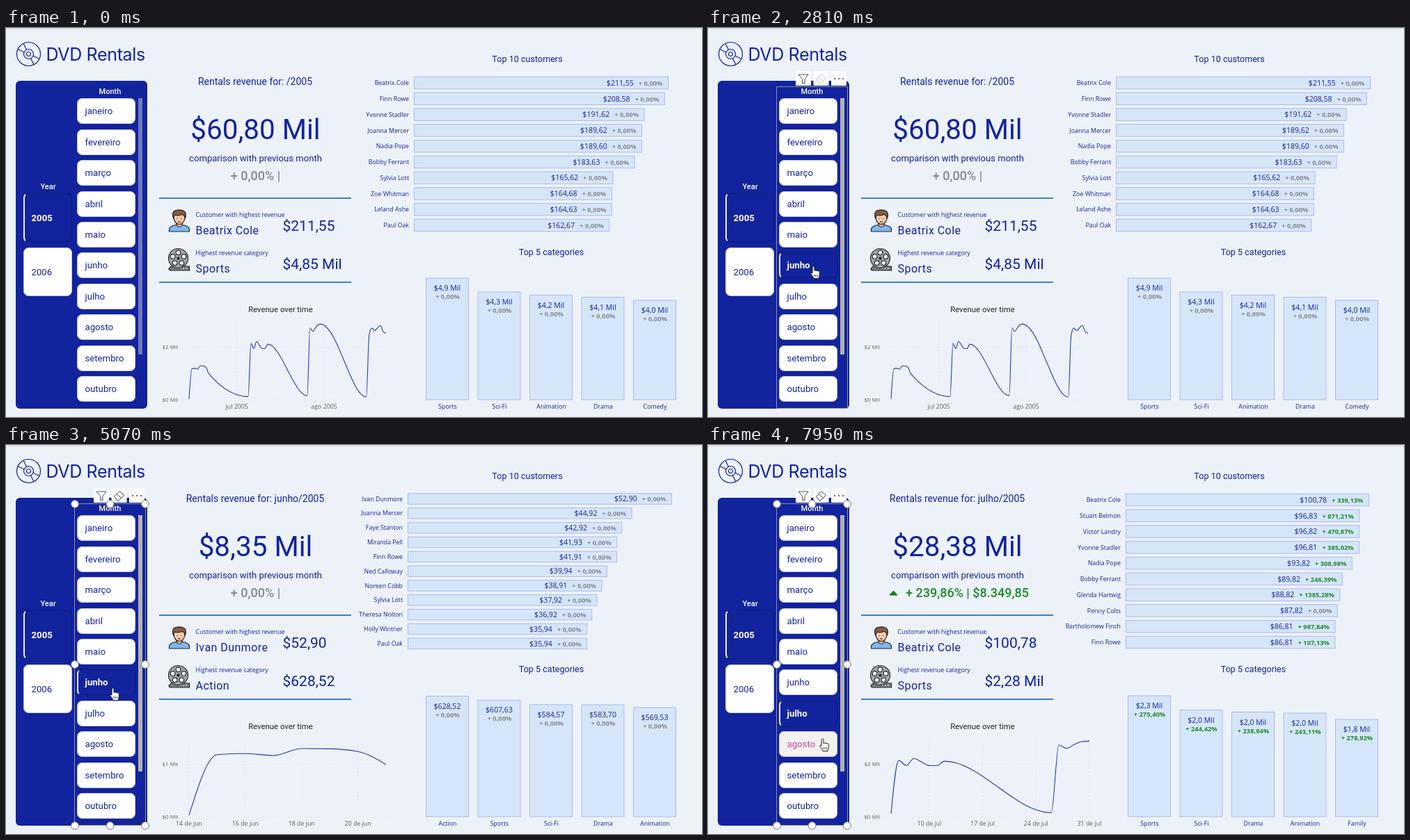
Write an HTML page that moves like this. It is 1000 px wide and 560 px high and loops after 8000 ms.

```html
<!DOCTYPE html>
<html lang="en">
<head>
<meta charset="utf-8">
<title>DVD Rentals</title>
<style>
html, body { margin: 0; width: 100%; height: 100%; overflow: hidden; background: #edf2f8; }
svg { display: block; width: 1000px; height: 560px; }
text { font-family: Roboto, "DejaVu Sans", sans-serif; font-weight: 400; fill: #12239e; }
.ui { font-family: "Open Sans", "Noto Sans", sans-serif; }
.logo { font: 400 25px Inter, sans-serif; letter-spacing: -.35px; }
.title { font-size: 14px; }
.sub { font-size: 13.1px; }
.total { font-size: 40.4px; }
.compare { font-size: 18px; font-weight: 500; }
.head { font-size: 12.6px; }
.dark { font-size: 11.35px; fill: #252423; }
.slicer { font-size: 11px; font-weight: 500; fill: #fff; }
.item { font-size: 13.2px; }
.best { font-size: 16px; letter-spacing: .45px; }
.money { font-size: 21px; }
.small { font-size: 8.8px; }
.value { font-size: 10.6px; }
.tick { font-size: 8.8px; fill: #605e5c; }
.ytick { font-size: 8px; fill: #605e5c; }
.pct { font-size: 9.3px; font-weight: 700; }
.gray { fill: #86888f; }
.up { fill: #1f8a2c; }
.white { fill: #fff; }
.pink { fill: #d0459f; }
.bold { font-weight: 600; }
.bar { fill: #d6e6f9; stroke: #abbbe9; }
.grid { stroke: #d3d8df; stroke-dasharray: 1 4; }
.line { fill: none; stroke: #2b3aa9; stroke-width: 1.1; }

.all, .jun, .jul, .idle, .focus, .clean, .handles, .overJun, .pickJun,
.overJul, .pickJul, .overAgo, .dots, .cursor { animation: 8s step-end infinite; }
.all { animation-name: all; }
.jun { animation-name: jun; }
.jul { animation-name: jul; }
.idle { animation-name: idle; }
.focus { animation-name: focus; }
.clean { animation-name: clean; }
.handles { animation-name: handles; }
.overJun { animation-name: overJun; }
.pickJun { animation-name: pickJun; }
.overJul { animation-name: overJul; }
.pickJul { animation-name: pickJul; }
.overAgo { animation-name: overAgo; }
.dots { animation-name: dots, spin; }
.cursor { animation-name: enter, move; }

@keyframes all { 0% { visibility: visible } 51.875%, to { visibility: hidden } }
@keyframes jun { 0% { visibility: hidden } 51.875% { visibility: visible } 79.375%, to { visibility: hidden } }
@keyframes jul { 0% { visibility: hidden } 79.375%, to { visibility: visible } }
@keyframes idle { 0% { visibility: visible } 22.25%, to { visibility: hidden } }
@keyframes focus { 0% { visibility: hidden } 22.25%, to { visibility: visible } }
@keyframes clean { 0% { visibility: hidden } 22.25% { visibility: visible } 47.625%, to { visibility: hidden } }
@keyframes handles { 0% { visibility: hidden } 47.625%, to { visibility: visible } }
@keyframes overJun { 0% { visibility: hidden } 24% { visibility: visible } 34.25%, to { visibility: hidden } }
@keyframes pickJun { 0% { visibility: hidden } 34.25% { visibility: visible } 76%, to { visibility: hidden } }
@keyframes overJul {
  0% { visibility: hidden } 22.25% { visibility: visible } 24% { visibility: hidden }
  65.125% { visibility: visible } 71.75%, to { visibility: hidden }
}
@keyframes pickJul { 0% { visibility: hidden } 71.75%, to { visibility: visible } }
@keyframes overAgo { 0% { visibility: hidden } 97.75%, to { visibility: visible } }
@keyframes dots {
  0% { visibility: hidden } 47.625% { visibility: visible } 51.875% { visibility: hidden }
  76% { visibility: visible } 79.375%, to { visibility: hidden }
}
@keyframes spin {
  0%, 47.625%, 76% { transform: translate(0, 0) }
  48.375%, 76.875% { transform: translate(-1px, 1px) }
  49.375%, 77.75% { transform: translate(-4px, 0) }
  50.5% { transform: translate(-4px, -3px) }
  78.625%, to { transform: translate(-2px, -3px) }
}
@keyframes enter { 0% { visibility: hidden } 21.375%, to { visibility: visible } }
@keyframes move {
  0% { transform: translate(82px, 425px) }
  22.25% { transform: translate(108px, 408px) }
  23.125% { transform: translate(140px, 388px) }
  24% { transform: translate(165px, 366px) }
  24.875% { transform: translate(177px, 360px) }
  25.75% { transform: translate(179px, 358px) }
  26.625% { transform: translate(170px, 357px) }
  27.5% { transform: translate(160px, 354px) }
  28.375% { transform: translate(154px, 352px) }
  63.375% { transform: translate(156px, 359px) }
  64.25% { transform: translate(157px, 367px) }
  65.125% { transform: translate(158px, 376px) }
  66% { transform: translate(158px, 381px) }
  66.75% { transform: translate(157px, 385px) }
  67.625% { transform: translate(156px, 388px) }
  73.5% { transform: translate(164px, 393px) }
  76% { transform: translate(163px, 398px) }
  96% { transform: translate(164px, 405px) }
  96.875% { transform: translate(165px, 413px) }
  97.75% { transform: translate(166px, 421px) }
  98.625% { transform: translate(167px, 427px) }
  99.375%, to { transform: translate(167px, 432px) }
}
</style>
</head>
<body>
<svg viewBox="0 0 1000 560">
  <rect width="1000" height="560" fill="#edf2f8"/>
  <rect width="1000" height="2" fill="#dfe2e7"/>

  <!-- disc -->
  <g fill="none" stroke="#12239e" stroke-width="1.2" transform="translate(32.5 37.5)">
    <circle r="17"/><circle r="7"/><circle r="3"/>
    <path d="M-6.5-2.500L-15.500-7M-3-6.300L-7.500-15.300M6.500 2.500L15.500 7M3 6.300L7.500 15.300"/>
  </g>

  <rect x="14" y="76" width="189" height="472" rx="6" fill="#12239e"/>
  <rect class="idle" x="190" y="101" width="6" height="369" fill="#6f79c0"/>
  <g id="slicers"></g>

  <path d="M220 245H496M220 366H496" stroke="#3583c9" stroke-width="2"/>

  <!-- person -->
  <g stroke="#23262f" stroke-width="1.2" stroke-linejoin="round">
    <path d="M234.500 293V290Q235 285 244 283.500H254Q263 285 263.500 290V293Z" fill="#7fb8f2"/>
    <path d="M245 279V284Q249 289 253 284V279Z" fill="#efb891"/>
    <path d="M241 269V274Q243 282.500 249 282.500T257 274V269Q249 263 241 269Z" fill="#f8cda8"/>
    <path d="M240.500 274Q237.500 264 244 262.500Q253 260.500 257 264.500Q259.500 268 257.500 274Q256.500 269 253 268.500Q247 271 242.500 269Z" fill="#8a5a3f"/>
    <path d="M246 274v1M252 274v1M247 278.500q2 1.200 4 0" fill="none"/>
  </g>

  <!-- film reel -->
  <g stroke="#24262b" stroke-width="1.2">
    <path d="M237 343H263.500V349H237Q234 349 234 346.500Z" fill="#777b80"/>
    <circle cx="247.5" cy="331.5" r="14" fill="#a4a8ad"/>
    <g id="holes" fill="#edf2f8"></g>
    <circle cx="247.5" cy="331.5" r="1.6" fill="#24262b"/>
    <path d="M250 346H262" stroke="#fff" stroke-dasharray="2 2"/>
  </g>

  <g id="labels"></g>
  <g id="views"></g>

  <g class="focus">
    <path d="M98.500 84.500H200.500V547.500H98.500Z" fill="none" stroke="#8f8f98"/>
    <rect x="190" y="101" width="6" height="369" fill="#b3b2b1"/>
    <path d="M126 62h22v21h-22zM151.500 62h22v21h-22zM177 62h22v21h-22z" fill="#fafafa"/>
    <path d="M130 67H144L139 73.500V79.500H135.500V73.500Z" fill="none" stroke="#555"/>
    <path d="M182 73h.1M188 73h.1M194 73h.1" stroke="#555" stroke-width="2.2" stroke-linecap="round"/>
  </g>
  <path class="clean" d="M155.500 74L163 66.500L169.500 72.500L162 79.500H159.500ZM159 70.500L166 76.500" fill="none" stroke="#cfcdcb"/>
  <g class="handles">
    <path d="M155.500 74L163 66.500L169.500 72.500L162 79.500H159.500ZM159 70.500L166 76.500" fill="none" stroke="#444"/>
    <g id="grips" fill="#fff" stroke="#77777c"></g>
  </g>
  <g class="dots" id="dots" fill="#62656b"></g>
  <g class="cursor">
    <path d="M-4-7.500a1.500 1.500 0 0 1 3 0v5a1.400 1.400 0 0 1 2.600.3a1.400 1.400 0 0 1 2.500.4a1.300 1.300 0 0 1 2.200 1v3.500c0 3-1 4-1.300 6h-7c-.3-2-2-3.500-4-6.500c-.8-1.500.5-2.500 1.700-1.500l.3.3z"
      fill="#fff" stroke="#111" stroke-linejoin="round"/>
    <path d="M1 3v3M3.500 3v3M-1.200 3v3" stroke="#111" stroke-width=".8"/>
  </g>
</svg>

<script>
const put = (id, html) => { document.getElementById(id).innerHTML += html; };
const text = (x, y, s, cls, anchor = 'start') =>
  `<text x="${x}" y="${y}" dy=".36em" class="${cls}" text-anchor="${anchor}">${s}</text>`;
const mid = (x, y, s, cls) => text(x, y, s, cls, 'middle');
const rect = (x, y, w, h, attrs) => `<rect x="${x}" y="${y}" width="${w}" height="${h}" ${attrs}/>`;
const circles = (points, r) => points.map(([x, y]) => `<circle cx="${x}" cy="${y}" r="${r}"/>`).join('');
const fmt = n => n.toFixed(2).replace('.', ',');
const pctText = n => `+ ${fmt(n)}%`;
const pctClass = n => 'ui pct ' + (n ? 'up' : 'gray');

// Slicer buttons
const button = (x, y, w, h, s, fill, cls) =>
  rect(x + .5, y + .5, w - 1, h - 1, `rx="7" fill="${fill}" stroke="#c4c6dc"`) + text(x + 11.5, y + h / 2, s, cls);
const picked = (x, y, w, h, s) =>
  rect(x, y, w, h, 'fill="#12239e"') +
  rect(x + .5, y + .5, w - 1, h - 1, 'rx="6" fill="#12239e" stroke="#101b6b"') +
  `<path d="M${x + 3} ${y + 2}Q${x + 1} ${y + 3} ${x + 1} ${y + 7}V${y + h - 7}Q${x + 1} ${y + h - 3} ${x + 3} ${y + h - 2}" fill="none" stroke="#fff" stroke-width="1.8"/>` +
  text(x + 11.5, y + h / 2, s, 'item white bold');

const months = ['janeiro', 'fevereiro', 'março', 'abril', 'maio', 'junho', 'julho', 'agosto', 'setembro', 'outubro'];
const monthBox = i => [102, Math.round(101.3 + 44.4 * i), 84, 37, months[i]];
const month = (i, fill, cls) => button(...monthBox(i), fill, cls);
const over = (i, cls) => `<g class="${cls}">${month(i, '#f3f2f1', 'item pink')}</g>`;
const pick = (i, cls) => `<g class="${cls}">${picked(...monthBox(i))}</g>`;

put('slicers',
  mid(60.5, 228, 'Year', 'slicer') + mid(149.5, 91, 'Month', 'slicer') +
  picked(25, 238, 70, 70, '2005') + button(25, 316, 70, 70, '2006', '#fff', 'item') +
  months.map((_, i) => month(i, '#fff', 'item')).join('') +
  over(5, 'overJun') + pick(5, 'pickJun') + over(6, 'overJul') + pick(6, 'pickJul') + over(7, 'overAgo'));

put('holes', circles([0, 1, 2, 3, 4].map(i => {
  const a = (i * 72 - 90) * Math.PI / 180;
  return [247.5 + 8.3 * Math.cos(a), 331.5 + 8.3 * Math.sin(a)];
}), 3.4));

put('grips', circles([[99, 85], [149.5, 85], [200, 85], [99, 316], [200, 316], [99, 548], [149.5, 548], [200, 548]], 5.4));
put('dots', circles([[227, 68], [227, 192], [227, 249], [391, 251], [227, 305], [391, 307],
  [507, 49], [576, 327], [227, 411], [29, 235]], 1.2));

put('labels',
  text(57.5, 37.5, 'DVD Rentals', 'logo') +
  mid(358.5, 187, 'comparison with previous month', 'sub') +
  text(272.5, 268.5, 'Customer with highest revenue', 'ui small') +
  text(272.5, 324, 'Highest revenue category', 'ui small') +
  mid(749, 44.5, 'Top 10 customers', 'head') +
  mid(783.5, 322.5, 'Top 5 categories', 'head') +
  mid(394.5, 405, 'Revenue over time', 'dark'));

// Runs of daily revenue, keyed by days since 14 June
const runs = {
  0: [35, 1177, 1195, 1160, 1290, 1286, 1235, 990],
  21: [129, 2132, 1944, 2210, 2076, 1940, 1938, 2108],
  42: [161, 2720, 2590, 2735, 2844, 2868, 2817, 2726],
  63: [112, 2457, 2711, 2615, 2724, 2810, 2577, 2524]
};
const days = Object.entries(runs).flatMap(([start, run]) => run.map((sum, i) => [+start + i, sum]));

// Cubic that keeps each stretch monotone
function curve(p) {
  const n = p.length;
  const step = i => p[i + 1][0] - p[i][0];
  const slope = i => (p[i + 1][1] - p[i][1]) / step(i);
  const m = p.map((_, i) => {
    if (!i || i === n - 1) return 0;
    const a = slope(i - 1), b = slope(i), h = step(i - 1), k = step(i);
    const mean = (a * k + b * h) / (h + k);
    return (Math.sign(a) + Math.sign(b)) * Math.min(Math.abs(a), Math.abs(b), Math.abs(mean) / 2);
  });
  m[0] = 1.5 * slope(0) - m[1] / 2;
  m[n - 1] = 1.5 * slope(n - 2) - m[n - 2] / 2;
  let d = 'M' + p[0];
  for (let i = 1; i < n; i++) {
    const [x0, y0] = p[i - 1], [x1, y1] = p[i], h = (x1 - x0) / 3;
    d += `C${x0 + h} ${y0 + h * m[i - 1]} ${x1 - h} ${y1 - h * m[i]} ${x1} ${y1}`;
  }
  return d;
}

function lineChart({ from, to, width, mil, ticks }) {
  const x = day => 263 + width * (day - from) / (to - from);
  const points = days.filter(([day]) => day >= from && day <= to)
    .map(([day, sum]) => [x(day), 535.5 - 76.3 * sum / (mil * 1000)]);
  const grid = 'M253 459.5H550M253 535.5H550' + ticks.map(([day]) => `M${x(day)} 425V535`).join('');
  return `<path class="grid" d="${grid}"/><path class="line" d="${curve(points)}"/>` +
    text(247, 459.5, `$${mil} Mil`, 'ui ytick', 'end') + text(247, 535.5, '$0 Mil', 'ui ytick', 'end') +
    ticks.map(([day, s]) => mid(x(day), 545, s, 'ui tick')).join('');
}

function customers({ left, width, first, step, height, rows }) {
  return rows.map(([name, value, pct = 0], i) => {
    const y = first + step * i, w = width * value / rows[0][1];
    return rect(left + .5, y - height / 2, w - 1, height, 'class="bar"') +
      text(left - 7, y, name, 'ui small', 'end') +
      text(left + w - 8.5, y, `$${fmt(value)}<tspan dx="7" class="${pctClass(pct)}">${pctText(pct)}</tspan>`, 'ui value', 'end');
  }).join('');
}

function categories(cols) {
  return cols.map(([name, value, top, pct = 0], i) => {
    const x = 634 + 74.5 * i;
    return rect(x - 30.5, top + .5, 61, 534.5 - top, 'class="bar"') +
      mid(x, top + 14.7, '$' + value, 'ui value') +
      mid(x + .5, top + 27.3, pctText(pct), pctClass(pct)) +
      mid(x + .5, 544.5, name, 'ui small');
  }).join('');
}

const view = (cls, v) => `<g class="${cls}">` +
  mid(358, 77, `Rentals revenue for: ${v.period}/2005`, 'title') +
  mid(358.5, 145, v.total, 'total') +
  (v.change
    ? '<path d="M260 216.5L266.5 209.5L273 216.5Z" fill="#107c10"/>' + text(284, 213, v.change, 'compare up')
    : mid(358.5, 213, '+ 0,00% |', 'compare gray')) +
  text(272.5, 291, v.customers.rows[0][0], 'best') + text(397.5, 284, '$' + fmt(v.customers.rows[0][1]), 'money') +
  text(272.5, 346.5, v.columns[0][0], 'best') + text(397.5, 339, v.best, 'money') +
  lineChart(v.line) + customers(v.customers) + categories(v.columns) + '</g>';

put('views', view('all', {
  period: '', total: '$60,80 Mil', best: '$4,85 Mil',
  customers: {
    left: 586, width: 366, first: 79, step: 22.78, height: 17.5,
    rows: [['Beatrix Cole', 211.55], ['Finn Rowe', 208.58], ['Yvonne Stadler', 191.62], ['Joanna Mercer', 189.62],
      ['Nadia Pope', 189.60], ['Bobby Ferrant', 183.63], ['Sylvia Lott', 165.62], ['Zoe Whitman', 164.68],
      ['Leland Ashe', 164.63], ['Paul Oak', 162.67]]
  },
  columns: [['Sports', '4,9 Mil', 359.5], ['Sci-Fi', '4,3 Mil', 379.5], ['Animation', '4,2 Mil', 384],
    ['Drama', '4,1 Mil', 387], ['Comedy', '4,0 Mil', 391.5]],
  line: { from: 0, to: 70, width: 283, mil: 2, ticks: [[17, 'jul 2005'], [48, 'ago 2005']] }
}) + view('jun', {
  period: 'junho', total: '$8,35 Mil', best: '$628,52',
  customers: {
    left: 577, width: 380, first: 77.5, step: 20.83, height: 15.5,
    rows: [['Ivan Dunmore', 52.90], ['Joanna Mercer', 44.92], ['Faye Stanton', 42.92], ['Miranda Pell', 41.93],
      ['Finn Rowe', 41.91], ['Ned Calloway', 39.94], ['Noreen Cobb', 38.91], ['Sylvia Lott', 37.92],
      ['Theresa Nolton', 36.92], ['Holly Wintner', 35.94], ['Paul Oak', 35.94]]
  },
  columns: [['Action', '628,52', 361], ['Sports', '607,63', 366.8], ['Sci-Fi', '584,57', 373.3],
    ['Drama', '583,70', 373.5], ['Animation', '569,53', 377.4]],
  line: {
    from: 0, to: 7, width: 283, mil: 1,
    ticks: [[0, '14 de jun'], [2, '16 de jun'], [4, '18 de jun'], [6, '20 de jun']]
  }
}) + view('jul', {
  period: 'julho', total: '$28,38 Mil', change: '+ 239,86% | $8.349,85', best: '$2,28 Mil',
  customers: {
    left: 600, width: 350, first: 79, step: 22.78, height: 17.5,
    rows: [['Beatrix Cole', 100.78, 339.13], ['Stuart Belmon', 96.83, 871.21], ['Victor Landry', 96.82, 470.87],
      ['Yvonne Stadler', 96.81, 385.02], ['Nadia Pope', 93.82, 308.98], ['Bobby Ferrant', 89.82, 246.39],
      ['Glenda Hartwig', 88.82, 1385.28], ['Penny Colts', 87.82], ['Bartholomew Finch', 86.81, 987.84],
      ['Finn Rowe', 86.81, 107.13]]
  },
  columns: [['Sports', '2,3 Mil', 360.5, 275.4], ['Sci-Fi', '2,0 Mil', 381, 244.42], ['Drama', '2,0 Mil', 384, 238.94],
    ['Animation', '2,0 Mil', 385.5, 243.11], ['Family', '1,8 Mil', 394.5, 278.92]],
  line: {
    from: 21, to: 47, width: 285, mil: 2,
    ticks: [[26, '10 de jul'], [33, '17 de jul'], [40, '24 de jul'], [47, '31 de jul']]
  }
}));
</script>
</body>
</html>
```
